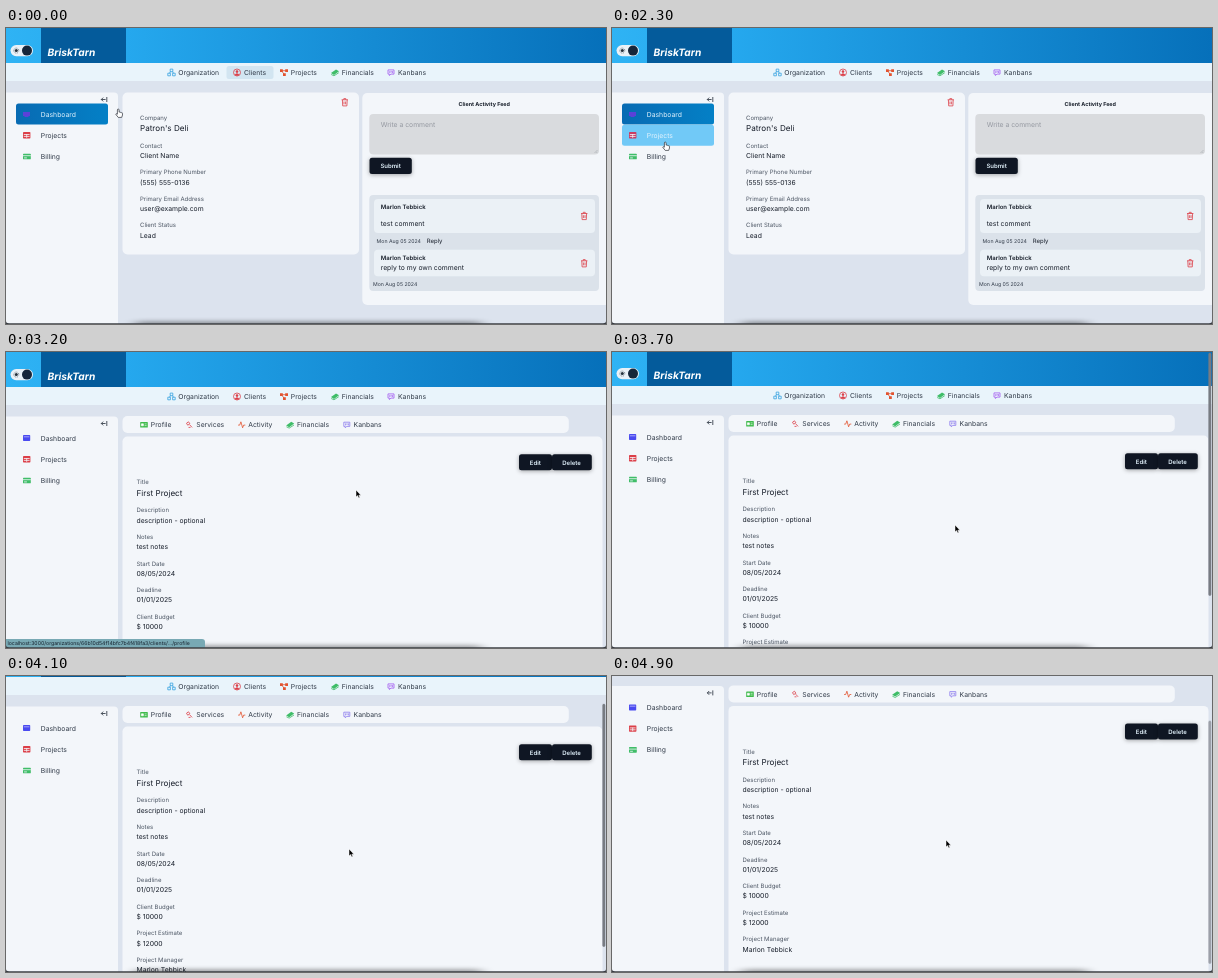
Animation of 600x296 px, one loop 5 s. Source, as an HTML page:

```html
<!DOCTYPE html>
<html lang="en">
<head>
<meta charset="utf-8">
<title>Client dashboard</title>
<style>
html, body { margin: 0; width: 100%; height: 100%; overflow: hidden; background: #dce3ee; }
svg { display: block; width: 100%; height: 100%; }
text { font: 6.8px Inter, sans-serif; fill: #161d29; text-rendering: geometricPrecision; }
.label text { font-size: 6px; fill: #4b5563; }
.nav text, .side text { fill: #303a48; }
.big { font-size: 8.1px; }
.bold { font-size: 6px; font-weight: 600; }
.small { font-size: 5.2px; fill: #303a48; }
.light, .lit text { fill: #e3f3fd; }
.card { fill: #f3f6fa; }
.button { fill: #0f1623; filter: drop-shadow(0 1.5px 2px #0005); }
.line { fill: none; stroke: currentColor; stroke-width: .8; }
.solid { fill: currentColor; }
.red { color: #dc3f48; } .blue { color: #38a3e0; } .green { color: #3fbd68; }
.orange { color: #e2532f; } .purple { color: #a45cf0; } .violet { color: #8c7cee; }
.indigo { color: #4a4af0; }

/* 2% equals 100 ms */
.stage, .stage .anim { animation: 5s step-end infinite; }
.stage { --s: 0; animation-name: scroll; }
.page { transform: translateY(calc(var(--s) * -1px)); }
.track { transform: translateY(calc(var(--s) * .82px)); }
.stage .thumb { animation-name: thumb; }
.stage .mark { animation-name: mark; }
.stage .hover { animation-name: hover; }
.stage .client { animation-name: client; }
.stage .project { animation-name: project; }
.stage .status { animation-name: status; }
.stage .cursor { animation-name: move; }

@keyframes scroll {
  0% { --s: 0 } 74% { --s: 1 } 76% { --s: 3 } 78% { --s: 7 } 80% { --s: 13.4 }
  82% { --s: 34 } 84% { --s: 52 } 86% { --s: 53.7 } 88% { --s: 54.3 } 90%, 100% { --s: 54.6 }
}
@keyframes thumb { 0% { opacity: 0 } 74% { opacity: 1 } 96% { opacity: .85 } 98%, 100% { opacity: .65 } }
@keyframes mark { 0% { opacity: 1 } 2% { opacity: .6 } 4% { opacity: .2 } 6%, 100% { opacity: 0 } }
@keyframes hover { 0% { opacity: 0 } 4% { opacity: .35 } 6% { opacity: .8 } 8%, 100% { opacity: 1 } }
@keyframes client { 0% { visibility: visible } 54%, 100% { visibility: hidden } }
@keyframes project { 0% { visibility: hidden } 54%, 100% { visibility: visible } }
@keyframes status { 0% { opacity: 0 } 54% { opacity: 1 } 68% { opacity: .5 } 70%, 100% { opacity: 0 } }
@keyframes move {
  0% { transform: translate(112px, 81px) }
  2% { transform: translate(104px, 88px) }
  4% { transform: translate(88px, 99px) }
  6% { transform: translate(70px, 108px) }
  8% { transform: translate(58px, 113px) }
  10% { transform: translate(53px, 114px) }
  50% { transform: translate(55px, 115px) }
  52% { transform: translate(90px, 118px) }
  54% { transform: translate(160px, 124px) }
  56% { transform: translate(250px, 131px) }
  58% { transform: translate(320px, 136px) }
  60% { transform: translate(350px, 138px) }
  66% { transform: translate(349px, 148px) }
  68% { transform: translate(346px, 162px) }
  70% { transform: translate(344px, 171px) }
  72% { transform: translate(343px, 173px) }
  96% { transform: translate(340px, 171px) }
  98%, 100% { transform: translate(334px, 164px) }
}
</style>
</head>
<body>
<svg class="stage" viewBox="0 0 600 296" preserveAspectRatio="none">
  <defs>
    <linearGradient id="sky"><stop stop-color="#2fb3f4"/><stop offset=".2" stop-color="#25a8ee"/><stop offset="1" stop-color="#0670ba"/></linearGradient>
    <linearGradient id="active"><stop stop-color="#086bb3"/><stop offset="1" stop-color="#0480c6"/></linearGradient>
    <filter id="blur" x="-20%" y="-200%" width="140%" height="500%"><feGaussianBlur stdDeviation="7 2"/></filter>

    <path id="trash" class="line" d="M-3.2-2.5H3.2M-1-2.5V-3.7H1V-2.5M-2.4-2.5L-2.1 3.6H2.1L2.4-2.5M-.8-.8V2M.8-.8V2"/>
    <path id="org" class="line" d="M-1.3-3.4h2.6v2.6h-2.6zM-3.7.7h2.6v2.6h-2.6zM1.1.7h2.6v2.6H1.1zM-2.4.7L-.6-.8M2.4.7L.6-.8"/>
    <g id="user"><circle class="line" r="3.5"/><circle class="solid" cy="-.9" r="1.3"/><path class="solid" d="M-2.3 2.3Q0-.8 2.3 2.3Q0 4 -2.3 2.3z"/></g>
    <g id="nodes"><path class="line" d="M-2.5-1.8H2.5M-2.5-1.8L.3 2"/><path class="solid" d="M-4-3.2h2.8v2.8H-4zM1.2-3.2H4v2.8H1.2zM-1 .8h2.8v2.6H-1z"/></g>
    <g id="money"><path class="solid" d="M-4 .6L1-3 4-1.2-1 2.4z"/><path class="line" d="M-3.8 2L-1 3.3 3.8 .2"/></g>
    <g id="board"><path class="line" d="M-3-2.6H3V1.6H0L-1.6 3V1.6H-3z"/><path class="line" d="M-1.2-1.4V.6M.2-1.4V0M1.6-1.4V.6"/></g>
    <g id="profile"><rect class="solid" x="-3.8" y="-2.8" width="7.6" height="5.6" rx=".6"/><path d="M-2.6-1h2v2h-2zM.6-.9h2M.6.8h2" fill="#fff" stroke="#fff" stroke-width=".6"/></g>
    <path id="tool" class="line" stroke-width="1.5" d="M-2.8-1.6L-.8-3 .6-1-1.6.4zM.4 0L2.8 2.6M-.8 2.6H1.2"/>
    <path id="pulse" class="line" d="M-3.6.3H-2L-.8-3 .9 3 2 .3H3.6"/>
    <g id="panel"><rect class="solid" x="-3.6" y="-3" width="7.2" height="6" rx=".7"/><path d="M-2.8-1.2H2.8" stroke="#fff" stroke-width=".5"/></g>
    <g id="table"><rect class="solid" x="-3.7" y="-3.2" width="7.4" height="6.4" rx=".7"/><path d="M-2.9-.7H2.9M-2.9 1.2H2.9M0-1V2.6" stroke="#f3f6fa" stroke-width=".8"/></g>
    <g id="payment"><rect class="solid" x="-3.9" y="-2.8" width="7.8" height="5.6" rx=".6"/><path d="M-3.9-.8H3.9M-2.8 1.4H0" stroke="#f3f6fa" stroke-width=".8"/></g>
  </defs>

  <rect width="600" height="296" fill="#dce3ee"/>

  <g class="page">
    <rect width="600" height="35" fill="url(#sky)"/>
    <rect x="35" width="85" height="35" fill="#045b9b"/>
    <rect x="4.5" y="17" width="22.5" height="11.2" rx="5.6" fill="#eaf1f7"/>
    <circle cx="21" cy="22.6" r="5" fill="#16263a"/>
    <circle cx="10.3" cy="22.6" r="1.5" fill="#26313d"/>
    <circle cx="10.3" cy="22.6" r="2.5" fill="none" stroke="#26313d" stroke-width=".8" stroke-dasharray=".7 1.263"/>
    <text x="41.5" y="28" style="font-size:10.2px;font-weight:700;font-style:italic;fill:#fff">BriskTarn</text>

    <rect y="35" width="600" height="18" fill="#e9f4fb"/>
    <rect class="anim mark" x="220.5" y="38" width="47" height="13" rx="2.5" fill="#d2e5f1"/>
    <g class="nav">
      <use href="#org" class="blue" x="165.5" y="44.5"/><text x="172.3" y="47">Organization</text>
      <use href="#user" class="red" x="231" y="44.5"/><text x="238" y="47">Clients</text>
      <use href="#nodes" class="orange" x="278" y="44.5"/><text x="284.8" y="47">Projects</text>
      <use href="#money" class="green" x="329" y="44.5"/><text x="335.8" y="47">Financials</text>
      <use href="#board" class="purple" x="385" y="44.5"/><text x="392" y="47">Kanbans</text>
    </g>

    <path class="card" d="M0 64.5H108q4 0 4 4V380H0z"/>
    <path d="M100.8 69V74M95.3 71.5H99.6M97.2 69.6L95.3 71.5 97.2 73.4" fill="none" stroke="#222b38" stroke-width=".8"/>
    <g class="side">
      <use href="#panel" class="indigo" x="20.6" y="86"/><text x="34.8" y="88.5">Dashboard</text>
      <use href="#table" class="red" x="20.7" y="107.2"/><text x="34.8" y="109.8">Projects</text>
      <use href="#payment" class="green" x="20.9" y="128.5"/><text x="34.8" y="131">Billing</text>
    </g>

    <g class="anim client">
      <g class="lit">
        <rect x="10" y="75.5" width="92" height="21" rx="2.5" fill="url(#active)"/>
        <path d="M17 84h7v4h-1.5v1h-4v-1H17z" fill="#5b41d8"/>
        <text x="34.8" y="88.5">Dashboard</text>
        <g class="anim hover">
          <rect x="10" y="96.7" width="92" height="21.1" rx="2.5" fill="#71c9f7"/>
          <use href="#table" x="20.7" y="107.2" color="#c83c62"/>
          <text x="34.8" y="109.8">Projects</text>
        </g>
      </g>

      <rect class="card" x="116.5" y="64.5" width="236.5" height="162" rx="5"/>
      <use href="#trash" class="red" x="338.8" y="74.3"/>
      <g transform="translate(134)">
        <g class="label">
          <text y="91.5">Company</text><text y="119.6">Contact</text>
          <text y="146.3">Primary Phone Number</text><text y="172.8">Primary Email Address</text>
          <text y="199.4">Client Status</text>
        </g>
        <text class="big" y="103">Patron's Deli</text><text y="130">Client Name</text>
        <text y="156.5">(555) 555-0136</text><text y="183">user@example.com</text>
        <text y="209.6">Lead</text>
      </g>

      <rect class="card" x="356.3" y="65" width="248" height="212" rx="5"/>
      <text x="478.3" y="77.7" text-anchor="middle" style="font-size:5.4px;font-weight:700">Client Activity Feed</text>
      <rect x="363.3" y="86" width="229.7" height="40.5" rx="4" fill="#d9dbde"/>
      <path d="M588.5 125L591.5 122M590.3 125L591.5 123.8" stroke="#8a8d92" stroke-width=".4"/>
      <text x="374.7" y="98.5" style="fill:#9599a1">Write a comment</text>
      <rect class="button" x="363.5" y="129.7" width="42.3" height="16.2" rx="2.5"/>
      <text class="bold light" x="384.6" y="140.1" text-anchor="middle">Submit</text>

      <rect x="363.3" y="167" width="229.7" height="96" rx="4" fill="#dbe2ea"/>
      <rect x="368" y="171" width="221" height="34" rx="4" fill="#ebf1f6"/>
      <rect x="368" y="221.7" width="221" height="26.5" rx="4" fill="#ebf1f6"/>
      <use href="#trash" class="red" x="578.2" y="188"/>
      <use href="#trash" class="red" x="578.2" y="235.3"/>
      <text class="bold" x="374.7" y="181.3">Marlon Tebbick</text>
      <text x="374.7" y="198.4">test comment</text>
      <text class="small" x="370.6" y="215">Mon Aug 05 2024</text>
      <text x="420.7" y="215.2" style="font-size:6px">Reply</text>
      <text class="bold" x="374.7" y="231.8">Marlon Tebbick</text>
      <text x="374.7" y="242">reply to my own comment</text>
      <text class="small" x="367" y="257.8">Mon Aug 05 2024</text>
    </g>

    <g class="anim project">
      <rect class="card" x="116.5" y="64" width="446.3" height="17" rx="5"/>
      <g class="nav">
        <use href="#profile" color="#3fbb4c" x="138" y="72.8"/><text x="144.8" y="75.3">Profile</text>
        <use href="#tool" class="red" x="183.3" y="72.8"/><text x="190.3" y="75.3">Services</text>
        <use href="#pulse" class="orange" x="235.7" y="72.8"/><text x="242.3" y="75.3">Activity</text>
        <use href="#money" class="green" x="284.2" y="72.8"/><text x="290.9" y="75.3">Financials</text>
        <use href="#board" class="violet" x="340.8" y="72.8"/><text x="347.6" y="75.3">Kanbans</text>
      </g>
      <rect class="card" x="116.5" y="84.5" width="480" height="300" rx="5"/>
      <rect class="button" x="513" y="102.2" width="33" height="16" rx="2.5"/>
      <rect class="button" x="546" y="102.2" width="39.8" height="16" rx="2.5"/>
      <g text-anchor="middle">
        <text class="bold light" x="529.3" y="112.5">Edit</text>
        <text class="bold light" x="565.6" y="112.5">Delete</text>
      </g>
      <g transform="translate(130.5)">
        <g class="label">
          <text y="132.2">Title</text><text y="160.3">Description</text><text y="187">Notes</text>
          <text y="213.6">Start Date</text><text y="240.2">Deadline</text><text y="266.8">Client Budget</text>
          <text y="293.4">Project Estimate</text><text y="320">Project Manager</text>
        </g>
        <text class="big" y="143.9">First Project</text><text y="170.6">description - optional</text>
        <text y="197.2">test notes</text><text y="223.8">08/05/2024</text><text y="250.4">01/01/2025</text>
        <text y="277">$ 10000</text><text y="303.6">$ 12000</text><text y="330.2">Marlon Tebbick</text>
      </g>
    </g>
  </g>

  <g class="track"><rect class="anim thumb" x="596.4" width="2.9" height="243" rx="1.4" fill="#777b82"/></g>
  <rect x="130" y="293.5" width="345" height="6" fill="#000" opacity=".38" filter="url(#blur)"/>
  <g class="anim status">
    <path d="M0 287H196q3 0 3 3V296H0z" fill="#78a9b4"/>
    <text x="1.5" y="293.2" style="font-size:5.2px;fill:#14202c">localhost:3000/organizations/66b10d54f14bfc7b4f418fa3/clients/.../profile</text>
  </g>
  <path d="M0 293Q0 295.2 3 295.2H597Q600 295.2 600 293V296H0z" fill="#3c4046"/>

  <g class="anim cursor">
    <path class="anim client" d="M-.6 1q0-1 .8-1t.9 1V3.2q.7-.5 1.2.2.7-.4 1.2.3.9-.2 1 .7V6L3.7 8.4H.2L-2.3 5.2q0-1 1.7 0z" fill="#fff" stroke="#2a2f36" stroke-width=".7"/>
    <path class="anim project" d="M0 0V7L1.6 5.6 2.7 8 3.8 7.5 2.8 5.2H4.9z" fill="#000" stroke="#fff" stroke-width=".5"/>
  </g>
</svg>
</body>
</html>
```
